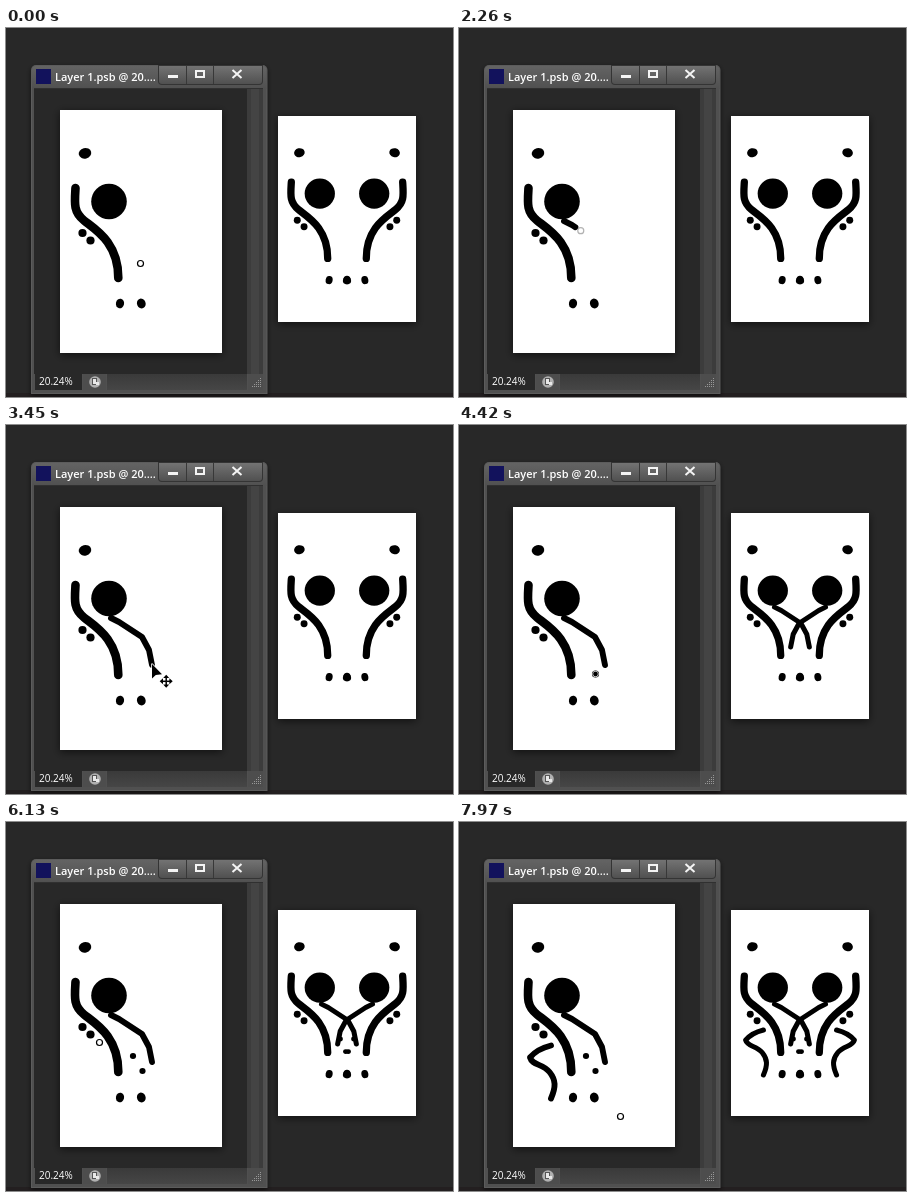
Animation of 447x369 px, one loop 8 s. Source, as an HTML page with a canvas:

```html
<!DOCTYPE html>
<html lang="en">
<head>
<meta charset="utf-8">
<title>Mirrored drawing</title>
<style>
html, body { margin: 0; width: 100%; height: 100%; overflow: hidden; background: #282828; }
canvas { display: block; }
</style>
</head>
<body>
<canvas id="stage" width="447" height="369"></canvas>
<script>
const ctx = document.getElementById('stage').getContext('2d');
const LOOP = 8000;
const PAINT_LAG = 60;
const FONT = '"Open Sans", "Noto Sans", sans-serif';

const clamp = v => Math.max(0, Math.min(1, v));
const ease = u => u * u * (3 - 2 * u);
const mix = (a, b, u) => a + (b - a) * u;

function curve(d) {
  const path = document.createElementNS('http://www.w3.org/2000/svg', 'path');
  path.setAttribute('d', d);
  const length = path.getTotalLength();
  return { shape: new Path2D(d), length, at: u => path.getPointAtLength(u * length) };
}

const bone = curve('M69.5 160C68.5 176 67.5 184 78 192.5S112.5 214 112.3 250');
const arm = curve('M105 193L113 197L136 212L143 225L146 240');
const hook = curve('M92 223.5Q78 227 71 235.5C73 243 84 242 90.5 250S97 265 92 276.5');

// The pointer rests between steps; "shown" is when the mirrored view updates
const move = (from, to, x, y) => ({ from, to, x, y });
const dot = (from, to, x, y, shown) => ({ from, to, x, y, shown, dot: true });
const line = (from, to, path, shown) => ({ from, to, path, shown });
const steps = [
  move(340, 610, 94, 224),
  move(830, 1600, 107, 187),
  move(1840, 2080, 105, 193),
  line(2080, 2700, arm, 3540),
  move(2700, 2760, 146, 239),
  move(3820, 3870, 142, 240),
  dot(4330, 4420, 136.5, 249, 5460),
  dot(4610, 4820, 127, 234, 5460),
  move(4990, 5200, 121, 210),
  move(5250, 5410, 115, 229),
  move(5670, 6120, 93.5, 220.5),
  move(6510, 6550, 92, 223.5),
  line(6550, 7140, hook, 7480),
  move(7140, 7170, 91, 276),
  move(7860, 7965, 161.5, 294.5)
];
const moveToolTimes = [[3030, 3820], [5000, 5440], [7170, 7460]];

function rect(color, x, y, w, h) {
  ctx.fillStyle = color;
  ctx.fillRect(x, y, w, h);
}

function rounded(fill, x, y, w, h, radii) {
  ctx.beginPath();
  ctx.roundRect(x, y, w, h, radii);
  ctx.fillStyle = fill;
  ctx.fill();
}

function gradient(y0, y1, top, bottom) {
  const g = ctx.createLinearGradient(0, y0, 0, y1);
  g.addColorStop(0, top);
  g.addColorStop(1, bottom);
  return g;
}

function shadowed(blur, draw) {
  ctx.save();
  ctx.shadowColor = 'rgba(0,0,0,.6)';
  ctx.shadowBlur = blur;
  ctx.shadowOffsetY = 2;
  draw();
  ctx.restore();
}

function label(text, x, y, font) {
  ctx.font = font + ' ' + FONT;
  ctx.fillStyle = '#fff';
  ctx.fillText(text, x, y);
}

function blob(x, y, rx, ry = rx, turn = 0) {
  ctx.beginPath();
  ctx.ellipse(x, y, rx, ry, turn, 0, 7);
  ctx.fillStyle = '#000';
  ctx.fill();
}

function drawCurve(path, width, part = 1) {
  if (part <= 0) return;
  ctx.save();
  ctx.lineWidth = width;
  ctx.lineCap = ctx.lineJoin = 'round';
  ctx.strokeStyle = '#000';
  if (part < 1) ctx.setLineDash([path.length * part, path.length * 2]);
  ctx.stroke(path.shape);
  ctx.restore();
}

function drawButtons() {
  rounded('#343434', 152, 37, 105, 20, [0, 0, 4, 4]);
  rounded(gradient(37, 56, '#757575', '#505050'), 153, 38, 103, 18, [0, 0, 3, 3]);
  for (const x of [180, 207]) rect('#383838', x, 38, 1, 18);
  rect('#f4f4f4', 162, 47, 10, 3);
  ctx.strokeStyle = '#f4f4f4';
  ctx.lineWidth = 2;
  ctx.strokeRect(190, 43, 8, 6);
  ctx.beginPath();
  for (const s of [-1, 1]) {
    ctx.moveTo(231 - 4.5 * s, 42);
    ctx.lineTo(231 + 4.5 * s, 50);
  }
  ctx.stroke();
}

function drawStatusBar() {
  rect('#282828', 29, 346, 47, 16);
  rect('#4d4d4d', 77, 346, 23, 16);
  rect(gradient(346, 362, '#3a3a3a', '#464646'), 101, 346, 140, 16);
  label('20.24%', 33, 357, '10px');
  ctx.beginPath();
  ctx.arc(89, 354, 5.8, 0, 7);
  ctx.fillStyle = '#b0b0b0';
  ctx.fill();
  rect('#555', 86, 350, 5, 7);
  rect('#e8e8e8', 87, 351, 3, 5);
  rect('#e8e8e8', 90, 354, 3, 3);
  rect('#4d4d4d', 242, 346, 15, 16);
  for (let i = 0; i < 5; i++)
    for (let j = 0; j <= i; j++) rect('#989898', 254 - 2 * j, 350 + 2 * i, 1, 1);
}

function drawWindow() {
  rect('#282828', 0, 0, 447, 369);
  rect('#231f20', 0, 365, 447, 4);
  shadowed(5, () => rounded('#5c5c5c', 25, 37, 236.5, 329, [5, 5, 0, 0]));
  rounded('#505050', 26, 38, 234.5, 327, [4, 4, 0, 0]);
  rounded(gradient(37, 61, '#646464', '#505050'), 26, 38, 234.5, 23, [4, 4, 0, 0]);
  rect('#282828', 28, 61, 213, 285);
  rect('#3c3c3c', 241, 61, 16, 285);
  rect('#444', 245, 61, 8, 285);
  rect('#303030', 28, 60, 229, 1);
  rect('#12125c', 30, 41, 15, 15);
  label('Layer 1.psb @ 20....', 49, 53, '600 11px');
  drawButtons();
  drawStatusBar();
  shadowed(8, () => rect('#fff', 54, 82, 162, 243));
  shadowed(8, () => rect('#fff', 272, 88, 138, 206));
}

function drawArt(progress) {
  drawCurve(bone, 8.6);
  blob(79, 125.3, 6.3, 5.3, -0.25);
  blob(103, 173.5, 17.8);
  blob(76.5, 205, 4.1);
  blob(84.5, 212.5, 4.1);
  blob(114, 275.5, 4.1, 4.8, 0.2);
  blob(135.3, 275.5, 4.3, 5, -0.4);
  for (const step of steps) {
    if (step.path) drawCurve(step.path, 5.9, progress(step));
    if (step.dot && progress(step) >= 1) blob(step.x, step.y, 3.1, 2.9);
  }
}

function drawMirror(t) {
  for (const side of [1, -1]) {
    ctx.save();
    ctx.translate(341, 88);
    ctx.scale(side * 0.85, 0.848);
    ctx.translate(-135, -82);
    drawArt(step => t >= step.shown ? 1 : 0);
    ctx.restore();
  }
}

function moveTool(x, y) {
  ctx.save();
  ctx.translate(x, y);
  ctx.beginPath();
  for (const p of [[0, 0], [0, 14.5], [3.8, 11], [10, 10.3]]) ctx.lineTo(...p);
  ctx.closePath();
  ctx.lineJoin = 'round';
  ctx.lineWidth = 1.6;
  ctx.strokeStyle = '#fff';
  ctx.stroke();
  ctx.fillStyle = '#000';
  ctx.fill();
  ctx.translate(14.2, 17.3);
  for (let i = 0; i < 4; i++) {
    ctx.rotate(Math.PI / 2);
    rect('#000', 0, -0.75, 5, 1.5);
    ctx.beginPath();
    ctx.moveTo(6.5, 0); ctx.lineTo(3.2, -3); ctx.lineTo(3.2, 3);
    ctx.fill();
  }
  ctx.restore();
}

function brushRing(x, y, strength) {
  ctx.save();
  ctx.globalCompositeOperation = 'difference';
  ctx.globalAlpha = strength;
  ctx.strokeStyle = '#fff';
  ctx.lineWidth = 1.2;
  ctx.beginPath();
  ctx.arc(x, y, 3, 0, 7);
  ctx.stroke();
  ctx.restore();
}

function drawPointer(t) {
  let x = 134.5, y = 235.5, pressed = false;
  for (const step of steps.filter(s => t >= s.from)) {
    const u = clamp((t - step.from) / (step.to - step.from));
    if (step.path) ({ x, y } = step.path.at(u));
    else {
      x = mix(x, step.x, ease(u));
      y = mix(y, step.y, ease(u));
    }
    pressed = step.path && u < 1;
  }
  if (moveToolTimes.some(([from, to]) => t >= from && t < to)) moveTool(x, y);
  else brushRing(x, y, pressed ? 0.3 : 1);
}

function render(t) {
  drawWindow();
  drawArt(step => {
    const lag = step.path ? PAINT_LAG : 0;
    return clamp((t - lag - step.from) / (step.to - step.from));
  });
  drawMirror(t);
  drawPointer(t);
}

const began = performance.now();
function tick() {
  render((performance.now() - began) % LOOP);
  requestAnimationFrame(tick);
}
tick();
</script>
</body>
</html>
```
